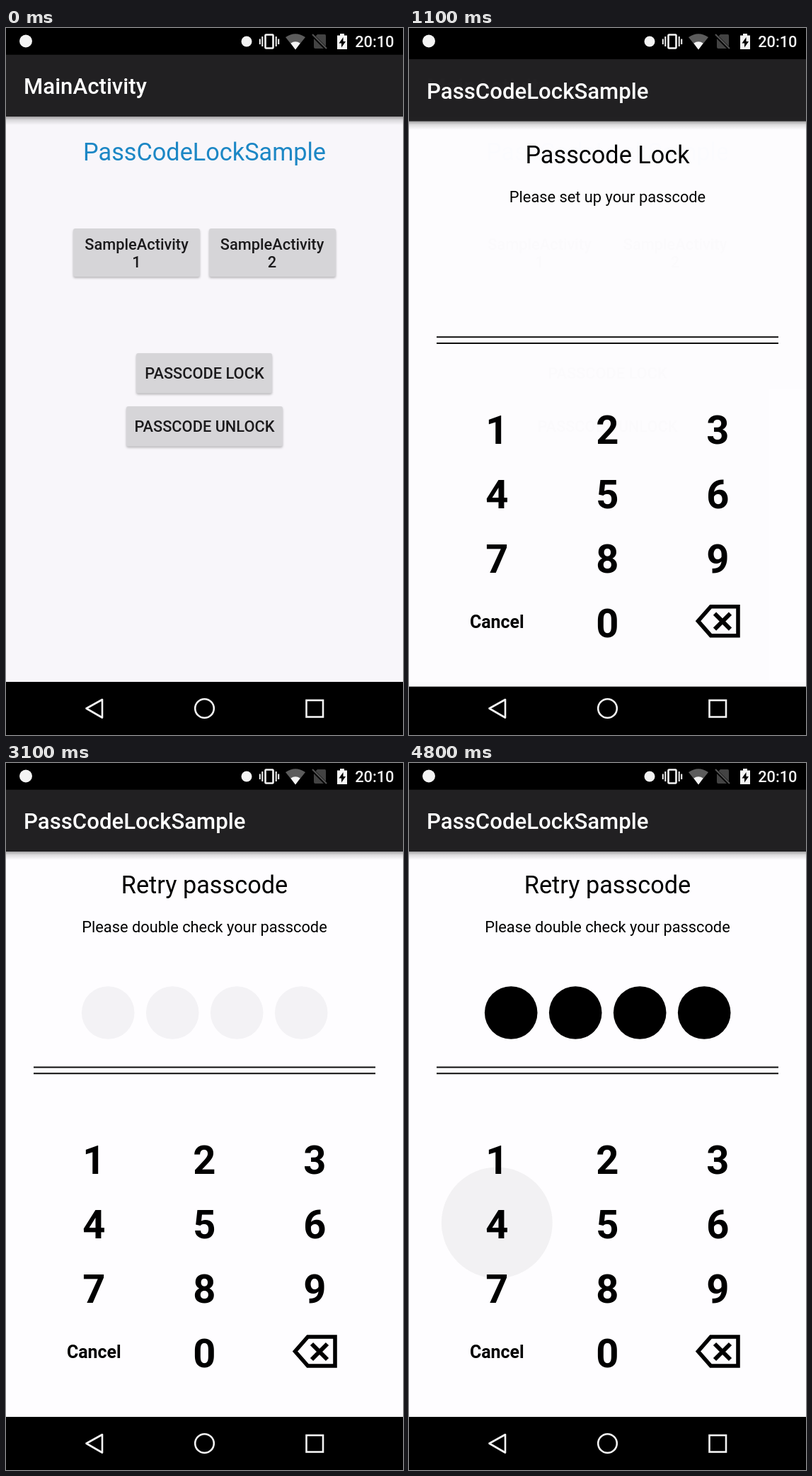
Animation, 561 px wide and 998 px high, one loop 5.1 s. Source, as an HTML page:

```html
<!DOCTYPE html>
<html lang="en">
<head>
<meta charset="utf-8">
<title>Passcode lock demo</title>
<style>
  html, body { margin: 0; width: 100%; height: 100%; overflow: hidden; background: #000; }
  svg { display: block; width: 100%; height: 100%; }
  text { font-family: Roboto, sans-serif; font-size: 21.8px; }
  .mid { text-anchor: middle; }
  .bar { font-size: 31.17px; font-weight: 500; fill: #fff; }
  .large { font-size: 34.28px; }
  .label { font-weight: 500; fill: #1b1a1c; }
  .digit { font-size: 56.1px; font-weight: 700; }
  .cancel { font-size: 24.93px; font-weight: 700; }
  .button { fill: #d6d5d8; filter: drop-shadow(0 2px 1.5px rgba(0, 0, 0, .25)); }
  .line { fill: none; stroke: #f4f4f4; stroke-width: 2.6; }
</style>
</head>
<body>
<svg viewBox="0 0 561 998">
  <defs>
    <linearGradient id="shade" x2="0" y2="1">
      <stop offset="0" stop-opacity=".36"/>
      <stop offset=".4" stop-opacity=".13"/>
      <stop offset="1" stop-opacity="0"/>
    </linearGradient>
    <g id="appbar">
      <rect width="561" height="37.5"/>
      <rect y="37.5" width="561" height="87.5" fill="#212022"/>
      <rect y="125" width="561" height="12" fill="url(#shade)"/>
    </g>
  </defs>
  <rect width="561" height="998"/>

  <g id="home">
    <rect y="125" width="561" height="798" fill="#f8f6fa"/>
    <use href="#appbar"/>
    <text class="bar" x="25" y="93">MainActivity</text>
    <text class="large mid" x="280.5" y="186.5" fill="#1c87c5">PassCodeLockSample</text>
    <rect class="button" x="95" y="283" width="179" height="68" rx="3"/>
    <rect class="button" x="287" y="283" width="179" height="68" rx="3"/>
    <rect class="button" x="184" y="459" width="192" height="56.5" rx="3"/>
    <rect class="button" x="170" y="534" width="221" height="56.5" rx="3"/>
    <rect id="press" x="184" y="459" width="192" height="56.5" rx="3" opacity="0"/>
    <g class="label mid">
      <text x="184.5" y="312.5">SampleActivity</text>
      <text x="184.5" y="338">1</text>
      <text x="376" y="312.5">SampleActivity</text>
      <text x="376" y="338">2</text>
      <text x="280.5" y="495">PASSCODE LOCK</text>
      <text x="280.5" y="570">PASSCODE UNLOCK</text>
    </g>
  </g>

  <g id="lock" opacity="0">
    <rect y="125" width="561" height="798" fill="#fefdff"/>
    <use href="#appbar"/>
    <text class="bar" x="25" y="93">PassCodeLockSample</text>
    <text id="heading" class="large mid" x="280.5" y="184"></text>
    <text id="hint" class="mid" x="280.5" y="239"></text>
    <g id="ripples"></g>
    <g id="dots"></g>
    <path d="M39 429.5H522M39 438.3H522" stroke="#0c0c0c" stroke-width="1.9"/>
    <g id="keys" class="mid"></g>
    <text class="cancel mid" x="124.3" y="840">Cancel</text>
    <g fill="none" stroke="#000" stroke-width="5.6">
      <path d="M408.5 830.5L426.5 810H465V851H426.5Z"/>
      <path d="M432 820L454 842M454 820L432 842" stroke-width="6"/>
    </g>
  </g>

  <g fill="#f4f4f4">
    <rect width="561" height="37.5" fill="#000"/>
    <circle cx="28" cy="18.5" r="9"/>
    <circle cx="340" cy="19" r="7.5"/>
    <rect class="line" x="366.5" y="9.5" width="11" height="19" rx="1"/>
    <path class="line" d="M362.3 12V26M358.8 15.5V23M381.7 12V26M385.2 15.5V23" style="stroke-width:2"/>
    <path d="M395 13Q409 3.5 423 13L409 30.5Z" fill="#5c5c5c"/>
    <path d="M402.3 21.5Q409 17 415.7 21.5L409 30.5Z"/>
    <path d="M440 9H450.5Q452 9 452 11V27Q452 29 450 29H437Q435 29 435 27V14Z" fill="#434343"/>
    <path d="M432 9L453 30" stroke="#000" stroke-width="4.5"/>
    <path d="M433 9L453 29" stroke="#555" stroke-width="2"/>
    <path d="M472 8H478V10.5H482V30H468V10.5H472Z"/>
    <path d="M476.5 13L470.5 21.5H474V27.5L480 19H476.5Z" fill="#000"/>
    <text x="548.5" y="27" text-anchor="end" font-weight="500">20:10</text>
  </g>
  <g class="line">
    <path d="M113.5 960.5L136 948V973.5Z" stroke-linejoin="round"/>
    <circle cx="280.5" cy="960.5" r="13.3"/>
    <rect x="424.5" y="949" width="23.5" height="23.5"/>
  </g>
</svg>
<script>
const LOOP = 5100, STEP = 100, ENTER = 963;
const COLUMNS = [124.3, 280.3, 436.3];
const $ = id => document.getElementById(id);

function add(parent, tag, attrs, text = "") {
  const node = document.createElementNS("http://www.w3.org/2000/svg", tag);
  for (const name in attrs) node.setAttribute(name, attrs[name]);
  node.textContent = text;
  return parent.appendChild(node);
}

for (let digit = 0; digit < 10; digit++) {
  const slot = digit ? digit - 1 : 10;
  add($("keys"), "text", {
    class: "digit", x: COLUMNS[slot % 3], y: 580 + 91 * Math.floor(slot / 3)
  }, digit);
}
const dots = [0, 1, 2, 3].map(i => add($("dots"), "circle", { cx: 144.2 + 91 * i, cy: 352.5, r: 37.3 }));

const halo = (key, opacity, r = 90) => ({
  cx: COLUMNS[(key - 1) % 3], cy: 558 + 91 * Math.floor((key - 1) / 3), r, opacity
});
const touch = { cx: 127.8, cy: 583, r: 18, opacity: .06 };

// Each stage holds until the next one begins.
const stages = [
  { at: 0, filled: 0, ripples: [] },
  { at: 1900, filled: 1, ripples: [halo(1, .008), touch] },
  { at: 2000, filled: 1, ripples: [halo(1, .03)] },
  { at: 2200, filled: 2, ripples: [halo(1, .016), halo(2, .008)] },
  { at: 2400, filled: 3, ripples: [halo(2, .024), halo(3, .007)] },
  { at: 2900, filled: 4, ripples: [halo(4, .008)] },
  { at: 3100, filled: 0, retry: true, ripples: [] },
  { at: 3700, filled: 1, retry: true, ripples: [halo(1, .007), touch] },
  { at: 4000, filled: 2, retry: true, ripples: [halo(2, .008)] },
  { at: 4300, filled: 3, retry: true, ripples: [halo(3, .008)] },
  { at: 4800, filled: 4, retry: true, ripples: [halo(4, .047, 78.5)] }
];

const remaining = (time, duration, power) =>
  (1 - Math.min(1, Math.max(0, (time - ENTER) / duration))) ** power;

function showStage({ filled, retry, ripples }) {
  $("heading").textContent = retry ? "Retry passcode" : "Passcode Lock";
  $("hint").textContent = retry ? "Please double check your passcode" : "Please set up your passcode";
  dots.forEach((dot, i) => dot.setAttribute("fill", i < filled ? "#000" : retry ? "#f3f2f5" : "none"));
  $("ripples").replaceChildren();
  ripples.forEach(ripple => add($("ripples"), "circle", ripple));
}

let current;
function draw(now) {
  const time = Math.floor(now % LOOP / STEP) * STEP;
  $("press").setAttribute("opacity", time === 800 ? .04 : time === 900 ? .08 : 0);
  $("lock").setAttribute("opacity", 1 - remaining(time, 200, 4));
  $("lock").setAttribute("transform", `translate(0 ${80 * remaining(time, 350, 5)})`);
  const stage = stages.findLast(s => s.at <= time);
  if (stage !== current) showStage(current = stage);
}

const start = performance.now();
(function frame() {
  draw(performance.now() - start);
  requestAnimationFrame(frame);
})();
</script>
</body>
</html>
```
